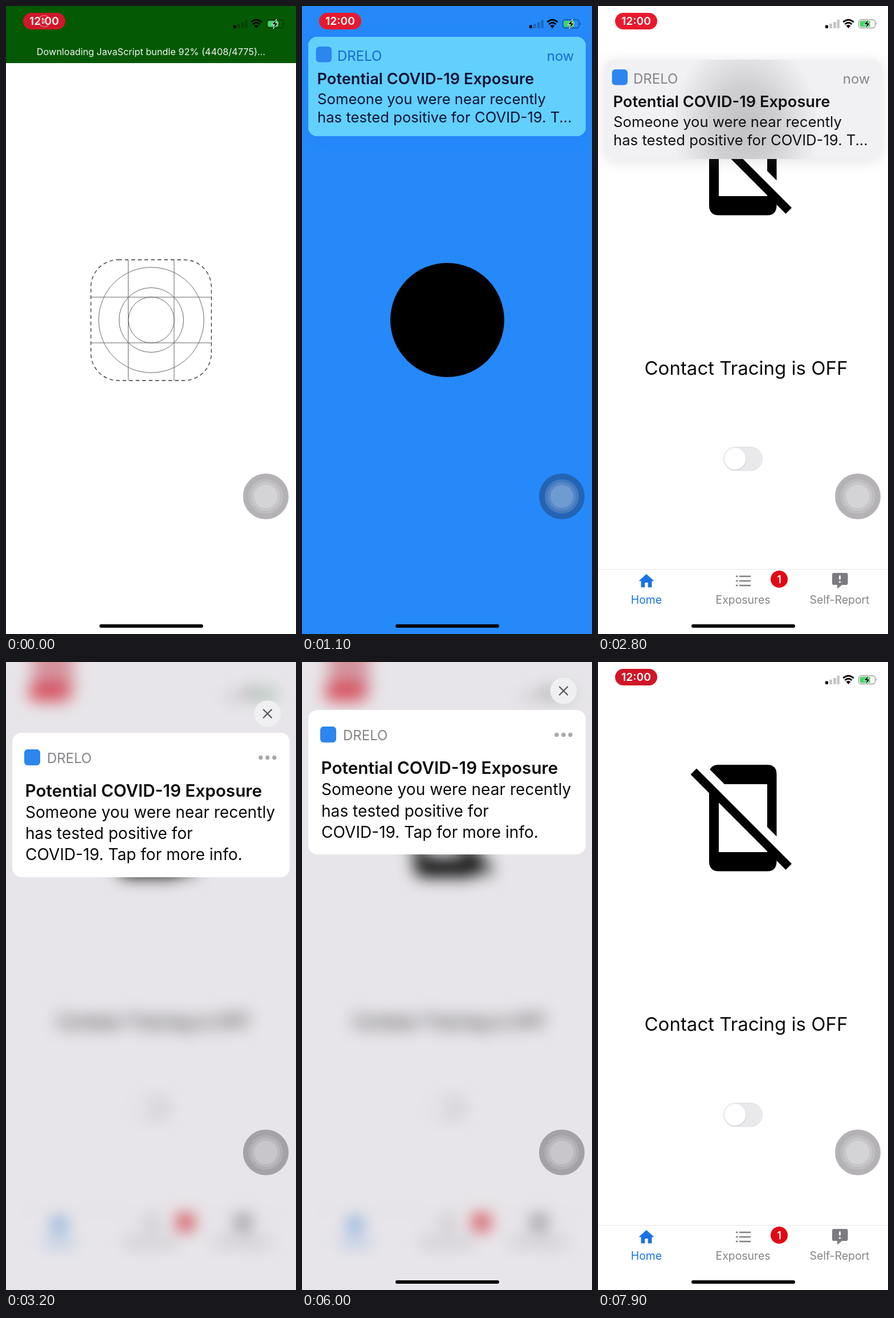
An HTML page for the animation above (8000 ms loop, 509x1100 px).

```html
<!DOCTYPE html>
<html lang="en">
<head>
<meta charset="utf-8">
<title>Exposure notice</title>
<style>
  html, body { margin: 0; width: 100%; height: 100%; overflow: hidden; background: #fff; }
  svg { display: block; width: 509px; height: 1100px; font-family: Inter, Roboto, sans-serif; }
  .mid { text-anchor: middle; }
  .end { text-anchor: end; }
  .semi { font-weight: 600; }
  #tint { mix-blend-mode: multiply; }
</style>
</head>
<body>
<svg viewBox="0 0 509 1100" xmlns="http://www.w3.org/2000/svg">
  <defs>
    <filter id="blur" filterUnits="userSpaceOnUse" x="-60" y="-60" width="629" height="1220" color-interpolation-filters="sRGB">
      <feGaussianBlur id="dev" stdDeviation="0"/>
    </filter>
    <filter id="soft" x="-20%" y="-30%" width="140%" height="160%"><feGaussianBlur stdDeviation="12"/></filter>
    <radialGradient id="smudge" gradientUnits="userSpaceOnUse" cx="0" cy="0" r="1" gradientTransform="translate(258 115) scale(130 155)">
      <stop offset="0" stop-color="#c1c0c3"/>
      <stop offset=".45" stop-color="#d0cfd2"/>
      <stop offset="1" stop-color="#f1f0f3"/>
    </radialGradient>
  </defs>

  <g id="scene">
    <rect x="-60" y="-60" width="629" height="1220" fill="#fff"/>

    <g id="loading">
      <g fill="none" stroke="#666">
        <rect x="149" y="444.500" width="211.500" height="211.500" rx="48" stroke="#333" stroke-width="1.300" stroke-dasharray="6.500 5"/>
        <path d="M214.500 444V656M295 444V656M149 510H361M149 590H361"/>
        <circle cx="255" cy="550" r="92.300"/>
        <circle cx="255" cy="550" r="56.600"/>
        <circle cx="255" cy="550" r="40.200"/>
      </g>
      <g id="bar">
        <rect width="509" height="100" fill="#045a04"/>
        <text id="bundle" class="mid" x="254.500" y="86" font-size="16.300" fill="#f1f6f1"></text>
      </g>
    </g>

    <g id="splash">
      <rect width="509" height="1100" fill="#2589fa"/>
      <circle cx="255" cy="550" r="100"/>
    </g>

    <g id="home">
      <path fill-rule="evenodd" d="M212 180H297Q313.500 180 313.500 197V349Q313.500 366.500 297 366.500H212Q195 366.500 195 349V197Q195 180 212 180ZM212 214V333H297V214Z"/>
      <path fill="#fff" d="M170 162V184L330 344V322Z"/>
      <path d="M173 186.500L340 353.500L329.500 364L162.500 197Z"/>
      <text class="mid" x="260" y="645.500" font-size="33" fill="#0c0c0e">Contact Tracing is OFF</text>
      <rect x="220.500" y="772.500" width="68" height="41.500" rx="20.700" fill="#e9e8eb" stroke="#e2e1e4"/>
      <circle cx="241" cy="794" r="19.500" fill="#d2d1d5"/>
      <circle cx="240.500" cy="793" r="19" fill="#fff"/>
      <path d="M0 987H509" stroke="#ececee" stroke-width="1.500"/>
      <g font-size="19.400" class="mid" fill="#858488">
        <text x="85" y="1047" fill="#1a73e2">Home</text>
        <text x="254.500" y="1047">Exposures</text>
        <text x="424" y="1047">Self-Report</text>
      </g>
      <path fill="#1a73e2" transform="translate(68.700 991) scale(1.357)" d="M10 20v-6h4v6h5v-8h3L12 3 2 12h3v8z"/>
      <path stroke="#808084" stroke-width="2.600" d="M248 999H268M248 1007H268M248 1015H268M242 999h3.500M242 1007h3.500M242 1015h3.500"/>
      <path fill="#7c7b7f" d="M414 993H435.500Q438.500 993 438.500 996V1011Q438.500 1014 435.500 1014H428L420 1021V1014H414Q411 1014 411 1011V996Q411 993 414 993Z"/>
      <path stroke="#fff" stroke-width="2.800" d="M424.500 997.500V1004.500M424.500 1007.500V1010.300"/>
      <circle cx="318" cy="1004" r="15" fill="#e30816"/>
      <text class="mid semi" x="318" y="1010.500" font-size="18" fill="#fff">1</text>
    </g>

    <g id="status">
      <rect id="smear" x="36" y="-60" width="74" height="92" fill="#d8485a" opacity="0"/>
      <rect x="30" y="12" width="74" height="29" rx="14.500" fill="#e8192d"/>
      <rect id="dim" x="30" y="12" width="74" height="29" rx="14.500"/>
      <text class="mid semi" x="67" y="33" font-size="19.300" fill="#fff">12:00</text>
      <g id="rec" fill="none" stroke="#e9a0a6" stroke-width="1.600">
        <circle cx="67" cy="26.500" r="10"/>
        <circle cx="67" cy="26.500" r="4" fill="#e9a0a6"/>
      </g>
      <rect x="399" y="33.500" width="5" height="5.500" rx="1"/>
      <path opacity=".22" d="M406 31h5v8h-5zM413 28h5v11h-5zM419.500 24h4.500v15h-4.500z"/>
      <path d="M439.500 39L435.500 34.500Q439.500 31.500 443.500 34.500Z"/>
      <path fill="none" stroke="#000" stroke-width="2.800" d="M433.500 32Q439.500 26.500 445.500 32M430.300 28.300Q439.500 20 448.700 28.300"/>
      <rect x="457.500" y="24" width="29" height="14.500" rx="4.500" fill="none" stroke="#000" stroke-opacity=".4" stroke-width="1.300"/>
      <path d="M488 28.500q2.500 2.500 0 5z" opacity=".4"/>
      <rect x="459.500" y="26" width="18.500" height="10.500" rx="2.500" fill="#43d567"/>
      <path stroke="#e8f5ea" stroke-width="1" d="M475 23L466.500 32.500H471.500L469 40L478 30H473Z"/>
    </g>
  </g>

  <rect id="tint" width="509" height="1100" fill="#e7e5e9"/>

  <g id="card">
    <rect id="shade" x="11" y="4" width="487" height="174" rx="18" filter="url(#soft)"/>
    <rect id="sheet" x="11" width="487" rx="16" fill="#fff"/>
    <g id="brief">
      <rect id="face" x="11" width="487" height="174" rx="16"/>
      <rect x="24.500" y="17" width="27.500" height="27.500" rx="6" fill="#2c86ee"/>
      <g id="label" font-size="24">
        <text x="62" y="42">DRELO</text>
        <text class="end" x="477.500" y="42">now</text>
      </g>
      <g id="words" font-size="25.700">
        <text class="semi" x="26.500" y="83" font-size="27.200">Potential COVID-19 Exposure</text>
        <text x="27" y="117.500">Someone you were near recently</text>
        <text x="27" y="150">has tested positive for COVID-19. T...</text>
      </g>
    </g>
    <g id="full" font-size="28.100" fill="#0b0b0d">
      <rect x="32" y="29" width="28" height="28" rx="6" fill="#2c86ee"/>
      <text x="72" y="53" font-size="24" fill="#858488">DRELO</text>
      <g fill="#a9a8ac">
        <circle cx="447" cy="43.500" r="3.700"/>
        <circle cx="459" cy="43.500" r="3.700"/>
        <circle cx="471" cy="43.500" r="3.700"/>
      </g>
      <text class="semi" x="33.500" y="112" font-size="29.700">Potential COVID-19 Exposure</text>
      <text x="34" y="149">Someone you were near recently</text>
      <text x="34" y="186.500">has tested positive for</text>
      <text x="34" y="223.500">COVID-19. Tap for more info.</text>
      <circle cx="459" cy="-33.500" r="23.300" fill="#f0eff1"/>
      <path d="M452 -40.500l14 14m0 -14l-14 14" stroke="#555458" stroke-width="2.200" stroke-linecap="round"/>
    </g>
  </g>

  <g fill="none">
    <circle cx="456" cy="859" r="35" stroke="#231f28" stroke-opacity=".34" stroke-width="10"/>
    <circle cx="456" cy="859" r="27.500" stroke="#6b686e" stroke-opacity=".44" stroke-width="5"/>
    <circle cx="456" cy="859" r="22.500" stroke="#8a888c" stroke-opacity=".48" stroke-width="5"/>
    <circle cx="456" cy="859" r="20" fill="#afacb0" fill-opacity=".53"/>
  </g>
  <rect id="grip" x="164" y="1083" width="182" height="6" rx="3" fill="#050506"/>
</svg>

<script>
const LOOP = 8000;
const $ = id => document.getElementById(id);
const set = (id, attrs) => {
  for (const key in attrs) $(id).setAttribute(key, attrs[key]);
};
const show = (id, on) => set(id, { display: on ? 'inline' : 'none' });
const part = (t, a, b) => Math.min(1, Math.max(0, (t - a) / (b - a)));
const ease = (t, a, b) => {
  const p = part(t, a, b);
  return p * p * (3 - 2 * p);
};
const easeOut = (t, a, b) => 1 - (1 - part(t, a, b)) ** 3;

function drawScreen(t) {
  const blue = t >= 500 && t < 1500;
  show('loading', t < 500);
  show('splash', blue);
  show('home', t >= 1500);

  const count = Math.floor(4408 + 367 * part(t, 60, 420));
  $('bundle').textContent =
    `Downloading JavaScript bundle ${Math.floor(count / 47.75)}% (${count}/4775)...`;

  set('face', { fill: blue ? '#62d0fc' : 'url(#smudge)' });
  set('label', { fill: blue ? '#1867d6' : '#858488' });
  set('words', { fill: blue ? '#0c1238' : '#111114' });
  set('shade', { fill: blue ? '#1568d8' : '#77757c' });
  set('rec', { opacity: 0.6 * (1 - part(t, 0, 250)) });
  set('dim', { opacity: 0.1 * (1 - ease(t, 0, 400) + ease(t, 7500, 7900)) });
}

function drawBlur(t) {
  const p = ease(t, 2850, 3150) - ease(t, 7300, 7700);
  const scale = 1 - 0.05 * p;
  set('scene', {
    transform: `translate(254.5 550) scale(${scale}) translate(-254.5 -550)`,
    filter: p > 0 ? 'url(#blur)' : 'none'
  });
  set('dev', { stdDeviation: 15 * p });
  set('tint', { opacity: p });
  set('smear', { opacity: 0.5 * p });
}

function drawCard(t) {
  const open = ease(t, 2850, 3100);
  const y = -190 + 244 * easeOut(t, 700, 1000) + 40 * easeOut(t, 2700, 2800)
    + 30 * open - 40 * ease(t, 3200, 3600);
  show('card', t > 700 && t < 7650);
  set('card', { transform: `translate(0 ${y})`, opacity: 1 - ease(t, 7300, 7650) });
  set('sheet', { height: 174 + 79 * open });
  set('brief', { opacity: 1 - open });
  set('full', { opacity: open });
  set('shade', { opacity: 0.2 * (1 - open) });
  set('grip', { opacity: 1 - ease(t, 2900, 3150) + ease(t, 3500, 3750) });
}

function frame(now) {
  const t = now % LOOP;
  drawScreen(t);
  drawBlur(t);
  drawCard(t);
  requestAnimationFrame(frame);
}
frame(0);
</script>
</body>
</html>
```
